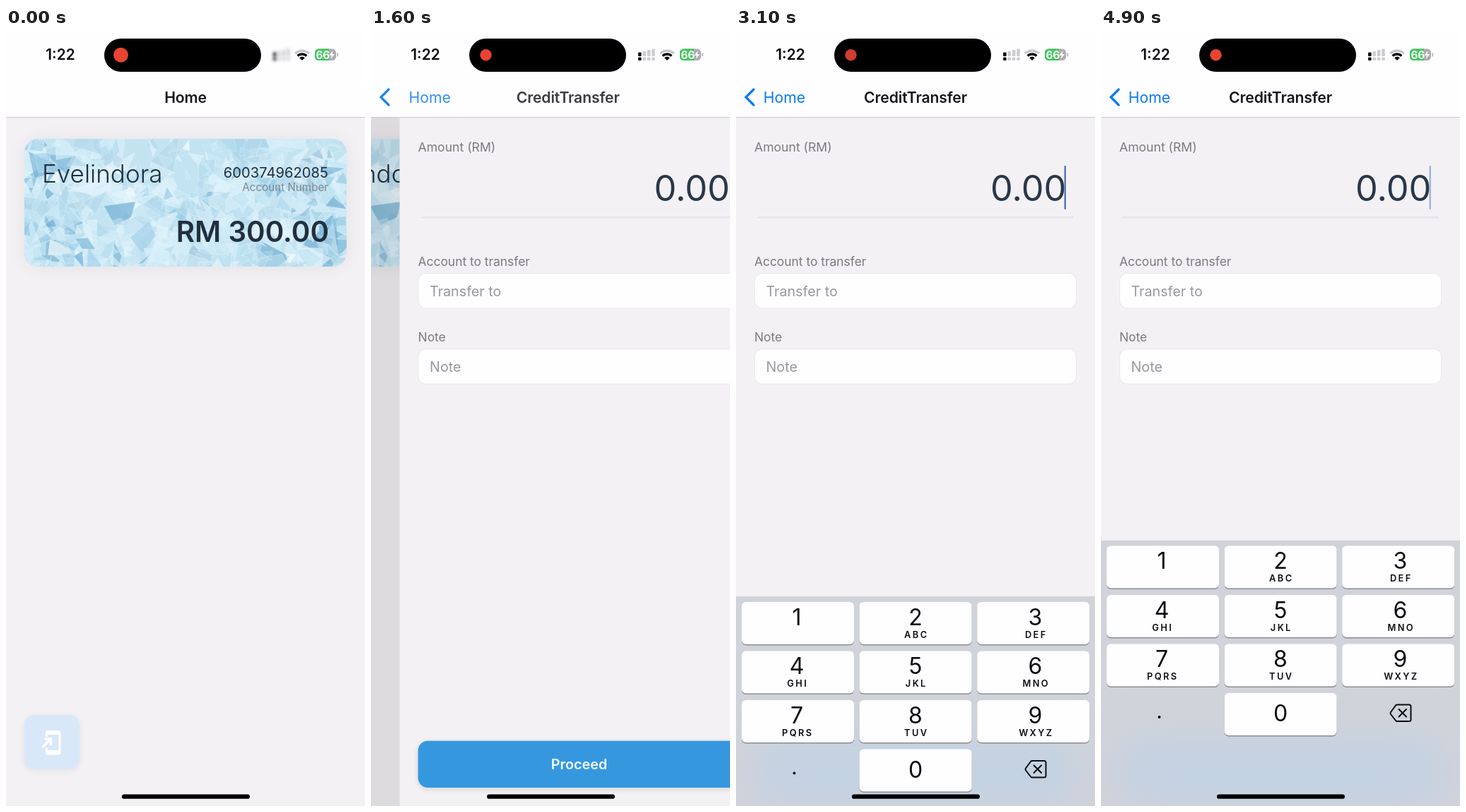
Recreate the animation shown at these times as an HTML page with a canvas. Size 508x1102 px, loop 5000 ms.

```html
<!DOCTYPE html>
<html lang="en">
<head>
<meta charset="utf-8">
<title>Credit transfer</title>
<style>
html, body { margin: 0; width: 100%; height: 100%; overflow: hidden; background: #f4f1f5; }
canvas { display: block; }
</style>
</head>
<body>
<canvas id="stage" width="508" height="1102"></canvas>
<script>
const W = 508, H = 1102, LOOP = 5000;
const PUSH_START = 1372.6, KEYS_START = 2941;
const BG = '#f4f1f5', BLUE = '#0a7aea', INK = '#212f40';
const ctx = document.getElementById('stage').getContext('2d');

const clamp = v => Math.max(0, Math.min(1, v));
const ramp = (t, a, b) => clamp((t - a) / (b - a));
const smooth = v => v * v * (3 - 2 * v);

// Critically damped spring, 0 to 1
function spring(ms) {
  const x = Math.max(0, ms) * 0.01826;
  return 1 - (1 + x) * Math.exp(-x);
}

function text(s, x, y, size, color, weight = 400, align = 'left', spacing = 0) {
  ctx.font = `${weight} ${size}px Inter, "Liberation Sans", sans-serif`;
  ctx.letterSpacing = spacing + 'px';
  ctx.textAlign = align;
  ctx.fillStyle = color;
  ctx.fillText(s, x, y);
}

function box(x, y, w, h, r, color, shadow) {
  ctx.save();
  if (shadow) [ctx.shadowColor, ctx.shadowBlur, ctx.shadowOffsetY] = shadow;
  ctx.fillStyle = color;
  ctx.beginPath();
  ctx.roundRect(x, y, w, h, r);
  ctx.fill();
  ctx.restore();
}

function line(d, width, color, cap = 'butt') {
  ctx.lineWidth = width;
  ctx.strokeStyle = color;
  ctx.lineCap = cap;
  ctx.stroke(new Path2D(d));
}

function layer(alpha, dx, dy, draw) {
  ctx.save();
  ctx.globalAlpha *= alpha;
  ctx.translate(dx, dy);
  draw();
  ctx.restore();
}

// Ice texture: translucent overlapping shards, large ones first, darker towards the sides
function makeIce(w, h) {
  const canvas = document.createElement('canvas');
  canvas.width = w;
  canvas.height = h;
  const g = canvas.getContext('2d');
  let seed = 77;
  const rnd = () => (seed = (seed * 16807) % 2147483647) / 2147483647;
  const light = ['#b6dcee', '#c2e3f2', '#cdeaf6', '#d9f0fa', '#e4f5fd', '#b4d9eb'];
  const dark = ['#93c9e4', '#78b5d7', '#95bfd5', '#a3d2ea', '#6aabd0'];
  g.fillStyle = '#c3e3f1';
  g.fillRect(0, 0, w, h);
  const count = 460;
  for (let i = 0; i < count; i++) {
    const x = rnd() * w, y = rnd() * h;
    const size = 9 + 42 * (1 - i / count) * (0.3 + rnd());
    const side = Math.abs(x / w - 0.5) * 2;
    const set = rnd() < 0.06 + 0.26 * side * side ? dark : light;
    const corners = rnd() < 0.75 ? 3 : 4, turn = rnd() * 7;
    g.beginPath();
    for (let k = 0; k < corners; k++) {
      const a = turn + (k + rnd() * 0.7) * 2 * Math.PI / corners;
      const r = size * (0.25 + 0.9 * rnd());
      g.lineTo(x + Math.cos(a) * r, y + Math.sin(a) * r);
    }
    g.closePath();
    g.globalAlpha = 0.65;
    g.fillStyle = rnd() < 0.02 ? '#fafdff' : set[Math.floor(rnd() * set.length)];
    g.fill();
    g.globalAlpha = 0.5;
    g.strokeStyle = '#e6f6fd';
    g.lineWidth = 0.7;
    g.stroke();
  }
  return canvas;
}
const ice = makeIce(456, 181);

function shortcutButton() {
  box(26, 973, 78, 77, 14, '#d8e8f8', ['rgba(0,0,0,.07)', 10, 2]);
  line('M57.5 1004V998.5Q57.5 996.5 59.5 996.5H74Q76 996.5 76 998.5V1026Q76 1028 74 1028H59.5Q57.5 1028 57.5 1026V1019.5', 3.2, '#fff');
  box(57, 996, 19, 5, 1, '#fff');
  box(57, 1023, 19, 5, 1, '#fff');
  line('M51.5 1019L63 1007.5M54.5 1007H63.5V1016', 3.2, '#fff');
}

function homePage(t) {
  box(0, 127, W, H, 0, BG);
  box(26, 157, 456, 181, 20, '#c3e3f1', ['rgba(0,0,0,.07)', 24, 1]);
  ctx.save();
  ctx.beginPath();
  ctx.roundRect(26, 157, 456, 181, 20);
  ctx.clip();
  ctx.drawImage(ice, 26, 157);
  ctx.restore();
  text('Evelindora', 51, 218.5, 35, '#20303f', 300);
  text('600374962085', 456, 211.5, 20.2, INK, 400, 'right');
  text('Account Number', 456, 231, 15.2, '#7b8891', 400, 'right');
  text('RM 300.00', 457, 303, 40.3, INK, 600, 'right');
  const press = smooth(ramp(t, 1200, 1350)) - smooth(ramp(t, 1450, 1700));
  layer(1 - 0.66 * press, 0, 0, shortcutButton);
}

function field(label, hint, y) {
  text(label, 26, y - 10.5, 17.4, '#7a7b80');
  box(26, y, 456, 50.5, 11, '#ebe9ee');
  box(27, y + 1, 454, 48.5, 10, '#fefdff');
  text(hint, 42.5, y + 32.5, 19.7, '#98989d');
}

function transferPage(t) {
  box(0, 127, W, H, 0, BG);
  text('Amount (RM)', 26, 174.5, 17.6, '#7a7b80');
  text('0.00', 467.3, 244.8, 50.4, '#283849', 400, 'right');
  box(30, 267, 448, 2.4, 1.2, '#e4e4ea');
  field('Account to transfer', 'Transfer to', 347);
  field('Note', 'Note', 454.3);
  box(26, 1009.7, 456, 66.3, 14, '#3598df', ['rgba(0,0,0,.13)', 8, 2]);
  text('Proceed', 254, 1050, 19.8, '#f6fbff', 600, 'center');

  if (t > KEYS_START) {
    const phase = t % 1000;
    const off = ramp(phase, 500, 700) - ramp(phase, 840, 960);
    layer(1 - off, 0, 0, () => box(464.6, 195, 2.2, 62, 1, '#4169b0'));
  }
}

function keyboard(top) {
  ctx.save();
  ctx.beginPath();
  ctx.rect(0, top, W, H - top);
  ctx.clip();
  box(0, top, W, H, 0, '#d1d3da');
  // The button behind shows through as a blurred tint
  ctx.filter = 'blur(28px)';
  box(26, 1008, 456, 90, 20, 'rgba(190,210,230,.75)');
  ctx.filter = 'none';
  ctx.translate(0, top);

  const letters = ['', 'ABC', 'DEF', 'GHI', 'JKL', 'MNO', 'PQRS', 'TUV', 'WXYZ'];
  const centers = [86, 254, 423.5];
  const key = (x, y) => {
    box(x, y + 1.5, 159, 60, 6, '#8b8d92');
    box(x, y, 159, 60, 6, '#fefdff');
  };
  letters.forEach((s, i) => {
    const col = i % 3, y = 8 + 69.5 * Math.floor(i / 3);
    key(8 + 166.6 * col, y);
    text(i + 1, centers[col], y + 32.5, 32, '#0c0c0e', 400, 'center');
    text(s, centers[col] + 1.3, y + 50.5, 12.8, '#0c0c0e', 600, 'center', 2.4);
  });
  key(174.6, 216.5);
  text('0', 254, 256.5, 32, '#0c0c0e', 400, 'center');
  box(80.5, 248.5, 4, 4, 2, '#0c0c0e');
  ctx.lineJoin = 'round';
  line('M419 233H436Q438.5 233 438.5 235.5V254Q438.5 256.5 436 256.5H419Q418 256.5 417 255.5L410 246.5Q409 245 410 243.5L417 234Q418 233 419 233Z', 2, '#0c0c0e');
  line('M421.5 239.5L432 250M432 239.5L421.5 250', 2, '#0c0c0e', 'round');
  ctx.restore();
}

function header(p) {
  box(0, 0, W, 126, 0, '#fefdff');
  box(0, 126, W, 1, 0, '#cbc9ce');
  const title = (s, x, alpha) => layer(alpha, x, 0, () =>
    text(s, 0, 105.5, 21.2, '#17171b', 600, 'center', -0.15));
  title('Home', 254 - 135 * p, clamp(1 - 1.6 * p));
  const arrive = clamp(2 * p - 1);
  title('CreditTransfer', 254 + 309 * (1 - p), arrive);
  layer(arrive, 185 * (1 - p), 0, () => text('Home', 38.8, 105.5, 21.2, BLUE));
  layer(p, 0, 0, () => {
    ctx.lineJoin = 'miter';
    line('M25 87L14 98L25 109', 3.2, BLUE, 'round');
  });
}

function arc(r, width, color) {
  ctx.beginPath();
  ctx.arc(419, 46, r, -Math.PI * 0.75, -Math.PI * 0.25);
  ctx.lineWidth = width;
  ctx.lineCap = 'butt';
  ctx.strokeStyle = color;
  ctx.stroke();
}

function statusBar(t) {
  text('1:22', 77, 45.3, 20.8, '#0a0a0c', 600, 'center');
  const settle = 1 - smooth(ramp(t, 0, 500));

  box(139, 15, 222, 47, 23.5, '#000');
  const glow = 0.9 + 0.1 * Math.cos((t - 1300) / 1300 * 2 * Math.PI) - 0.09 * settle;
  const r = 8.2 + 2.3 * settle;
  box(162.5 - r, 38.2 - r, 2 * r, 2 * r, r, `rgb(${255 * glow}, ${74 * glow}, ${56 * glow})`);

  ctx.save();
  if (settle > 0.02) ctx.filter = `blur(${2 * settle}px)`;
  for (let i = 0; i < 4; i++) {
    const color = i ? '#cdccd1' : '#0a0a0c', x = 378 + 6.4 * i;
    box(x, 34.5 - 1.7 * i, 4.6, 5.5 + 1.7 * i, 1.2, color);
    box(x, 41.5, 4.6, 4.5, 1.2, color);
  }
  ctx.restore();

  arc(13.9, 3.2, '#c6c5ca');
  arc(9, 3.3, '#0a0a0c');
  arc(2.7, 5.4, '#0a0a0c');

  ctx.save();
  ctx.beginPath();
  ctx.roundRect(437, 29.5, 30, 16.5, 5.5);
  ctx.clip();
  box(437, 29, 30, 18, 0, '#adacb1');
  box(437, 29, 20, 18, 0, '#3fc75c');
  ctx.restore();
  box(468.3, 35.3, 1.8, 5, 0.9, '#b5b4b9');
  text('66', 448.3, 43.5, 15.4, '#fff', 700, 'center', -0.3);
  ctx.fillStyle = '#fff';
  ctx.fill(new Path2D('M462.8 32L457.3 38.8H460.8L459.6 44L465.2 37H461.7Z'));
}

function draw(t) {
  const p = spring(t - PUSH_START);
  ctx.clearRect(0, 0, W, H);
  if (p < 0.999) {
    layer(1, -0.3 * W * p, 0, () => homePage(t));
    box(0, 127, W, H, 0, `rgba(0,0,0,${0.1 * p})`);
  }
  if (p > 0) layer(1, W * (1 - p), 0, () => transferPage(t));
  header(p);
  statusBar(t);
  if (t > KEYS_START) keyboard(H - 376.5 * spring(t - KEYS_START));
  box(164, 1085.5, 181, 6.3, 3.15, '#000');
}

function tick(now) {
  draw(now % LOOP);
  requestAnimationFrame(tick);
}
requestAnimationFrame(tick);
</script>
</body>
</html>
```
